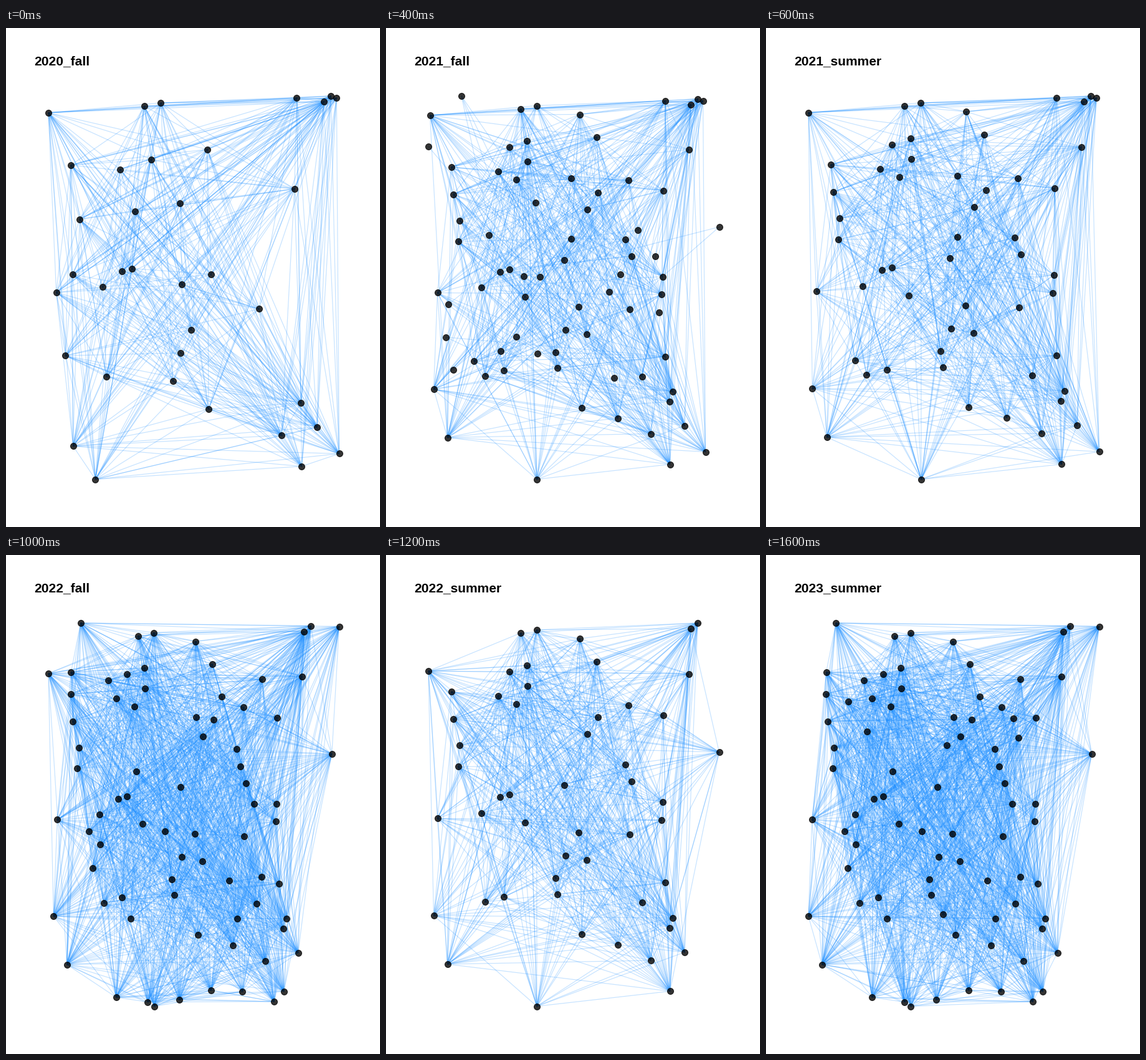
A matplotlib script that plays this animation: 600x800 px, repeating every 1800 ms.

```python
import numpy as np
import matplotlib.pyplot as plt
from matplotlib.animation import FuncAnimation
from matplotlib.collections import LineCollection

W, H, DPI = 600, 800, 100
PX = 72 / DPI
LEFT, RIGHT, TOP, BOTTOM = 68, 534.5, 109, 723.5

# Seasons in order of time; the animation plays them in order of name.
SEASONS = ["2020_summer", "2020_fall", "2021_summer", "2021_fall",
           "2022_breeding", "2022_summer", "2022_fall",
           "2023_breeding", "2023_summer"]
DENSITY = {"2020": .42, "2021": .27, "2022": .34, "2023": .33}
SHY_SEASON = 3  # sites new in this season have few links

# Landmark sites by the (first, last) season in which they are seen.
LANDMARKS = {
    (0, 8): [
        (216.5, 130), (242, 125), (500.5, 114), (489.5, 123), (105, 223.5),
        (180, 230), (227, 214.5), (445, 261), (118.5, 309), (183, 391),
        (198, 387), (83, 425), (153, 416.5), (391, 451), (288, 484),
        (272, 520.5), (159.5, 558), (314.5, 609.5), (455, 599.5),
        (425, 651), (479.5, 638), (456, 700)],
    (2, 8): [
        (311, 139), (486, 195), (338, 175.5), (198, 191.5), (108.5, 267),
        (323, 291), (286, 372), (394, 366), (444, 399), (448, 527),
        (77, 579.5), (99, 657), (242.5, 724), (411, 559), (460, 583.5),
        (372.5, 626)],
    (0, 1): [(108.5, 668), (142.5, 720.5)],
    (0, 3): [(71, 140.5), (448.5, 117), (509, 117), (513, 680)],
    (3, 3): [(121.5, 109.5)],
    (3, 6): [(68.5, 190.5)],
    (3, 8): [(535, 319.5)],
    (6, 8): [(121.5, 109.5), (547, 115)],
}
# Number of further sites scattered inside the area, by (first, last) season.
SCATTERED = {(0, 1): 8, (2, 8): 12, (2, 4): 3, (3, 3): 16, (6, 8): 16, (8, 8): 6}


def build_sites(rng, gap=24):
    """Return rows of x, y, first season, last season."""
    rows = [(*p, *span) for span, group in LANDMARKS.items() for p in group]
    # A row along the southern edge joins late.
    rows += [(x, 706 + rng.uniform(-14, 14), 6, 8)
             for x in np.linspace(180, 440, 6)]
    for span, count in SCATTERED.items():
        goal = len(rows) + count
        while len(rows) < goal:
            x, y = rng.uniform((95, 180), (450, 600))
            if all(np.hypot(x - r[0], y - r[1]) > gap for r in rows):
                rows.append((x, y, *span))
    return np.array(rows)


def fit(v, lo, hi):
    return lo + (v - v.min()) / np.ptp(v) * (hi - lo)


def network(sites, season):
    """Return the site positions and link segments of one season."""
    x, y, first, _ = sites[(sites[:, 2] <= season) & (season <= sites[:, 3])].T
    pos = np.column_stack([fit(x, LEFT, RIGHT), fit(y, TOP, BOTTOM)])

    # Outer sites are linked more often, and close pairs less often.
    mid = np.array([LEFT + RIGHT, TOP + BOTTOM]) / 2
    reach = np.hypot(*((pos - mid) / (mid - [LEFT, TOP])).T)
    pull = 0.8 + 0.6 * reach
    if season == SHY_SEASON:
        pull[first == season] *= 0.1

    i, j = np.triu_indices(len(pos), 1)
    dist = np.hypot(*(pos[i] - pos[j]).T)
    chance = (DENSITY[SEASONS[season][:4]] * pull[i] * pull[j]
              * np.minimum(1, .3 + dist / 250))
    keep = np.random.default_rng(40 + season).random(len(i)) < chance
    return pos, np.stack([pos[i[keep]], pos[j[keep]]], axis=1)


all_sites = build_sites(np.random.default_rng(7))
frames = [(name, *network(all_sites, SEASONS.index(name)))
          for name in sorted(SEASONS)]

fig = plt.figure(figsize=(W / DPI, H / DPI), dpi=DPI, facecolor="white")
ax = fig.add_axes([0, 0, 1, 1])
ax.set(xlim=(0, W), ylim=(H, 0))
ax.axis("off")

links = ax.add_collection(LineCollection(
    [], colors=[(30 / 255, 144 / 255, 1, .25)], linewidths=1.2 * PX, zorder=1))
dots = ax.scatter([], [], s=(10 * PX) ** 2, facecolors=[(0, 0, 0, .8)],
                  edgecolors=[(0, 0, 0, .8)], linewidths=1 * PX, zorder=2)
title = ax.text(45, 59, "", family="Liberation Sans", weight="bold",
                size=21 * PX, color="black", va="baseline")


def draw(k):
    name, pos, segments = frames[k]
    links.set_segments(segments)
    dots.set_offsets(pos)
    title.set_text(name)
    return links, dots, title


anim = FuncAnimation(fig, draw, frames=len(frames), interval=200,
                     repeat=True, repeat_delay=0)
plt.show()
```
